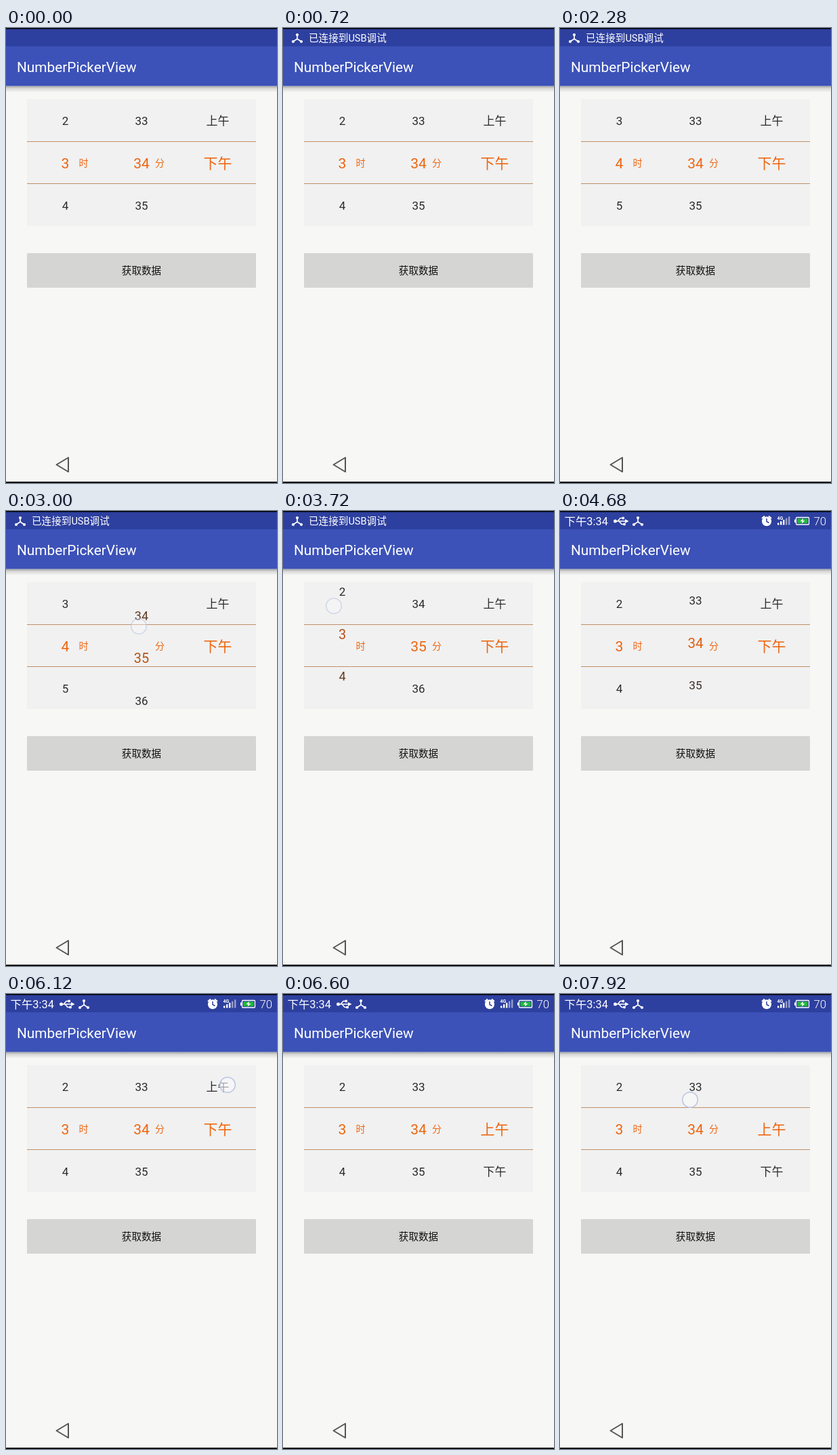
Animation, 400 px wide and 671 px high, one loop 8000 ms. Source, as an HTML page:

```html
<!DOCTYPE html>
<html lang="zh">
<head>
<meta charset="utf-8">
<title>NumberPickerView</title>
<style>
  html, body { margin: 0; width: 100%; height: 100%; overflow: hidden; background: #f7f7f5; }
  svg { display: block; width: 400px; height: 671px; font-family: Roboto, "Noto Sans CJK SC", "Noto Sans CJK", sans-serif; }
  .mid { text-anchor: middle; }
  .hint { font-size: 14px; fill: #ee6814; text-anchor: middle; }
</style>
</head>
<body>
<svg viewBox="0 0 400 671">
  <defs>
    <linearGradient id="shade" x2="0" y2="1">
      <stop offset="0" stop-color="#000" stop-opacity=".34"/>
      <stop offset=".4" stop-color="#000" stop-opacity=".12"/>
      <stop offset="1" stop-color="#000" stop-opacity="0"/>
    </linearGradient>
    <clipPath id="barClip"><rect y="1" width="400" height="26"/></clipPath>
    <clipPath id="pickerClip"><rect x="31" y="105" width="338" height="187"/></clipPath>
    <g id="hub" fill="#fff">
      <path d="M0-5V1L-6 5M0 1L6 5" fill="none" stroke="#fff" stroke-width="1.7"/>
      <circle cy="-5" r="2.1"/>
      <circle cx="-6" cy="5" r="2.1"/>
      <circle cx="6" cy="5" r="2.1"/>
    </g>
  </defs>

  <rect width="400" height="671" fill="#f7f7f5"/>
  <rect y="85.5" width="400" height="9.5" fill="url(#shade)"/>
  <rect y="27" width="400" height="58.5" fill="#3c52b8"/>
  <rect width="400" height="27" fill="#2e409f"/>
  <text x="16" y="65" font-size="20.8" fill="#fff">NumberPickerView</text>

  <g clip-path="url(#barClip)" fill="#fff">
    <g id="ticker">
      <use href="#hub" x="21" y="15"/>
      <text x="38" y="20" font-size="14.6">已连接到USB调试</text>
    </g>
    <g id="status">
      <text x="6.5" y="20.5" font-size="16.4">下午3:34</text>
      <path d="M81 15H97M85 15L89 10.5H92M87 15L91 19.5H94" fill="none" stroke="#fff" stroke-width="1.6"/>
      <circle cx="81.5" cy="15" r="2.5"/>
      <path d="M96 12L101.5 15L96 18ZM91.5 8.8h3.4v3.4h-3.4Z"/>
      <circle cx="95" cy="19.5" r="1.9"/>
      <use href="#hub" x="115" y="15"/>
      <circle cx="305" cy="15.3" r="7"/>
      <path d="M298 11L302 7.6M312 11L308 7.6" stroke="#fff" stroke-width="2"/>
      <path d="M305 11V15.5L308.5 17.5" fill="none" stroke="#2e409f" stroke-width="1.5"/>
      <text x="320.5" y="13" font-size="7" font-weight="700">4G</text>
      <g id="signal"></g>
      <rect x="348.5" y="9.5" width="19" height="10.5" rx="1" fill="none" stroke="#fff" stroke-width="1.3"/>
      <rect x="346" y="12.5" width="2" height="4.5"/>
      <rect x="350.3" y="11.3" width="15.4" height="6.9" fill="#20b83c"/>
      <path d="M359 10.8L354.5 15.3H357.7L356.5 18.8L361.5 14.2H358.3Z"/>
      <text x="374.5" y="20.8" font-size="16.8" font-weight="300">70</text>
    </g>
  </g>

  <rect x="31" y="105" width="338" height="187" fill="#f1f1f1"/>
  <path d="M31 167.5H369M31 229.5H369" stroke="#c09068"/>
  <g id="rows" class="mid" clip-path="url(#pickerClip)"></g>
  <text class="hint" x="114.5" y="204">时</text>
  <text class="hint" x="227" y="204">分</text>

  <rect x="31" y="332" width="338" height="51" rx="1" fill="#d5d5d3"/>
  <text class="mid" x="200" y="362.5" font-size="14.6" fill="#111">获取数据</text>

  <path d="M74.5 644L92 633.5V654.5Z" fill="none" stroke="#555" stroke-width="2" stroke-linejoin="round"/>
  <circle id="touch" r="11.3" fill="#fafafc" fill-opacity=".6" stroke="#bcc6e2" stroke-width="1.5"/>
  <path d="M0 .6H400M0 670H400" stroke="#000" stroke-width="2"/>
</svg>

<script>
const LOOP = 8000, STEP = 120, ROW = 62.5, DRAG = 21;
const $ = id => document.getElementById(id);
const mix = (a, b, k) => a + (b - a) * k;
const clamp = k => Math.min(1, Math.max(0, k));
const easeOut = k => 1 - (1 - k) ** 1.8;
const stepsSince = (start, t) => Math.floor((t - start) / STEP);
const progress = (start, steps, t) => clamp(stepsSince(start, t) / steps);

function add(parent, tag, attrs) {
  const node = document.createElementNS('http://www.w3.org/2000/svg', tag);
  set(node, attrs);
  return parent.appendChild(node);
}
function set(node, attrs) {
  for (const key in attrs) node.setAttribute(key, attrs[key]);
}

const columns = [
  { x: 87.5, value: 3, label: i => (i + 11) % 12 + 1 },
  { x: 200, value: 34, label: i => i % 60 },
  { x: 312.5, value: 1, label: i => ['上午', '下午'][i] ?? '' }
];
const [hour, minute, half] = columns;

// Each swipe turns its column by one row; dir is the finger's vertical direction.
const swipes = [
  { start: 1800, col: hour, dir: -1, x: 80, y: 212 },
  { start: 2760, col: minute, dir: -1, x: 196, y: 212 },
  { start: 3480, col: hour, dir: 1, x: 75, y: 98 },
  { start: 4320, col: minute, dir: 1, x: 192, y: 134 },
  { start: 6120, col: half, dir: 1, x: 327, y: 134 },
  { start: 7920, col: minute, dir: 1, x: 192, y: 156 }
];

for (const col of columns) {
  col.cells = Array.from({ length: 5 }, () => add($('rows'), 'text', { x: col.x }));
}
for (let i = 0; i < 5; i++) {
  const height = 3 + 2.3 * i;
  add($('signal'), 'rect', { x: 321 + 4 * i, y: 20.5 - height, width: 2.4, height, opacity: i < 3 ? 1 : .5 });
}

function drawColumn(col, t) {
  const pos = swipes.filter(s => s.col === col)
    .reduce((sum, s) => sum - s.dir * easeOut(progress(s.start, 4, t)), col.value);
  col.cells.forEach((cell, n) => {
    const i = Math.round(pos) + n - 2, d = i - pos;
    const near = clamp(1 - Math.abs(d));
    const size = mix(17, 21, near);
    cell.textContent = col.label(i);
    set(cell, {
      y: 199.4 + d * ROW + size * .36,
      'font-size': size,
      fill: `rgb(${mix(42, 238, near)},${mix(42, 100, near)},${mix(42, 14, near)})`
    });
  });
}

function drawBars(t) {
  const tickerIn = progress(240, 4, t), out = progress(3960, 3, t), statusIn = progress(3960, 2, t);
  set($('ticker'), {
    transform: `translate(0 ${26 * (1 - easeOut(tickerIn)) - 10 * out})`,
    opacity: tickerIn * (1 - out) ** 2
  });
  set($('status'), { transform: `translate(0 ${16 * (1 - statusIn)})`, opacity: statusIn });
}

function drawTouch(t) {
  const swipe = swipes.findLast(s => s.start <= t);
  const n = swipe ? stepsSince(swipe.start, t) : 3;
  set($('touch'), { opacity: n < 3 ? 1 - .2 * n : 0 });
  if (n < 3) set($('touch'), { cx: swipe.x, cy: swipe.y + swipe.dir * DRAG * n });
}

const origin = performance.now();
function frame() {
  const t = (performance.now() - origin) % LOOP;
  columns.forEach(col => drawColumn(col, t));
  drawBars(t);
  drawTouch(t);
  requestAnimationFrame(frame);
}
frame();
</script>
</body>
</html>
```
